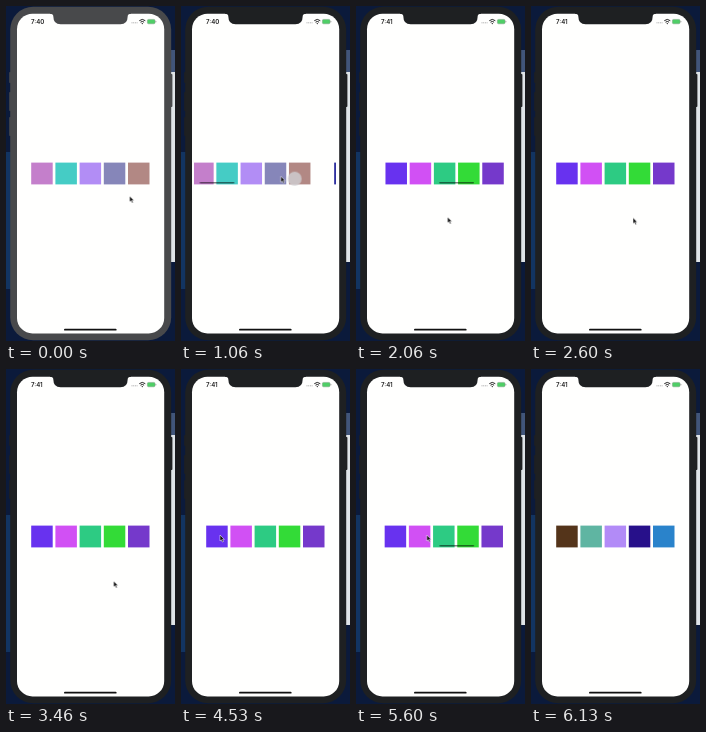
Animation of 169 by 335 pixels, one loop 6200 ms. Source, as an HTML page:

```html
<!DOCTYPE html>
<html lang="en">
<head>
<meta charset="utf-8">
<title>Paged colour squares</title>
<style>
@property --off { syntax: "<number>"; inherits: true; initial-value: 0; }
html, body { margin: 0; width: 100%; height: 100%; overflow: hidden; background: #0b1a38; }
svg { display: block; width: 169px; height: 335px; animation: scroll 6200ms infinite; }
svg * { animation-duration: 6200ms; animation-iteration-count: infinite; }
text { font: 600 6.1px Inter, "Liberation Sans", sans-serif; fill: #222; }

#strip { transform: translateX(calc(var(--off) * -1px)); }
#thumb { transform: translateX(calc(var(--off) * .243px)); }
#thumb rect { animation-name: fade; }
.case { fill: #1e2022; animation-name: focus; animation-timing-function: step-end; }
.early { animation-name: early; animation-timing-function: step-end; }
.late { animation-name: late; animation-timing-function: step-end; }
#cursor { animation-name: move; animation-timing-function: ease-in-out; }
#touch { animation-name: drag; }
#touch circle { animation-name: press; animation-timing-function: step-end; }

@keyframes scroll {
  0%, 15.32% { --off: 0; animation-timing-function: ease-in; }
  17.1% { --off: 13.7; animation-timing-function: linear; }
  19.2% { --off: 70; animation-timing-function: ease-out; }
  24.2%, 25.16% { --off: 142; animation-timing-function: ease-in; }
  28.39% { --off: 212; animation-timing-function: ease-out; }
  33.23% { --off: 279.7; animation-timing-function: ease-out; }
  36.45%, 74.2% { --off: 284; animation-timing-function: ease-in-out; }
  80.65%, 84.68% { --off: 253; animation-timing-function: ease-out; }
  90.32% { --off: 280.5; animation-timing-function: ease-out; }
  93.55% { --off: 284; animation-timing-function: step-end; }
  97.74%, 100% { --off: 426; }
}
@keyframes fade {
  0%, 15.32% { opacity: 0; }
  16.1%, 38.7% { opacity: 1; }
  42%, 74.2% { opacity: 0; }
  75%, 93.8% { opacity: 1; }
  97.3%, 100% { opacity: 0; }
}
@keyframes focus {
  0% { fill: #48494b; }
  15.08%, 100% { fill: #1e2022; }
}
@keyframes early {
  0% { visibility: visible; }
  24.68%, 100% { visibility: hidden; }
}
@keyframes late {
  0% { visibility: hidden; }
  24.68%, 100% { visibility: visible; }
}
@keyframes move {
  0%, 4% { transform: translate(123.6px, 190px); visibility: visible; }
  14% { transform: translate(128px, 171px); animation-timing-function: ease-in; }
  17.1% { transform: translate(100.3px, 170.3px); animation-timing-function: ease-out; }
  19.2% { transform: translate(58px, 170px); }
  24.7% { transform: translate(128px, 172px); }
  28.39% { transform: translate(58px, 176px); }
  33.23% { transform: translate(91.5px, 211px); }
  48%, 56% { transform: translate(107.6px, 212px); }
  70%, 74.2% { transform: translate(39px, 166px); }
  80.65%, 97% { transform: translate(70.8px, 166px); visibility: visible; }
  97.74%, 100% { transform: translate(70.8px, 166px); visibility: hidden; }
}
@keyframes drag {
  0%, 15.32% { transform: translate(128px, 173px); animation-timing-function: ease-in; }
  17.1% { transform: translate(114px, 172.7px); animation-timing-function: linear; }
  19.2% { transform: translate(58px, 172px); }
  25.16% { transform: translate(128px, 173px); animation-timing-function: ease-in; }
  28.39% { transform: translate(58px, 177px); }
  74.2% { transform: translate(40px, 167px); animation-timing-function: ease-in-out; }
  80.65%, 100% { transform: translate(71px, 167px); }
}
@keyframes press {
  0% { opacity: 0; }
  15.32% { opacity: .85; }
  19.2% { opacity: 0; }
  25.16% { opacity: .85; }
  28.39% { opacity: 0; }
  74.2% { opacity: .85; }
  84.68%, 100% { opacity: 0; }
}
</style>
</head>
<body>
<svg viewBox="0 0 169 335">
  <defs>
    <clipPath id="view"><rect x="13" y="150" width="142" height="35"/></clipPath>
  </defs>

  <!-- desktop behind the phone -->
  <rect width="169" height="335" fill="#0b1a3b"/>
  <rect y="146" width="8" height="137" fill="#123461"/>
  <rect x="161" y="44" width="8" height="22" fill="#41557a"/>
  <rect x="161" y="66" width="8" height="190" fill="#dfe4e8"/>

  <!-- phone -->
  <g class="case">
    <rect x="3.2" y="66" width="2" height="11" rx=".8"/>
    <rect x="3.2" y="86" width="2" height="19" rx=".8"/>
    <rect x="3.2" y="111" width="2" height="19" rx=".8"/>
    <rect x="164" y="68" width="2.4" height="33" rx=".8"/>
    <rect x="4.2" y=".8" width="161" height="333.4" rx="23"/>
  </g>
  <rect x="11" y="7.8" width="147.2" height="319.6" rx="15.5" fill="#fffffe"/>
  <path class="case" d="M44 7h81v.8q-3.4 0-3.4 3.2q0 7.2-7.2 7.2H54.6q-7.2 0-7.2-7.2q0-3.2-3.4-3.2z"/>

  <!-- status bar -->
  <text class="early" x="25" y="17.9">7:40</text>
  <text class="late" x="25" y="17.9">7:41</text>
  <path d="M125.5 16.8h6" stroke="#aaa" stroke-dasharray="1 .7"/>
  <g fill="none" stroke="#222" stroke-width="1">
    <path d="M133.3 14.7q3-2.6 6 0M134.5 16.2q1.8-1.5 3.6 0"/>
  </g>
  <circle cx="136.3" cy="17.6" r=".7" fill="#222"/>
  <rect x="141.4" y="13.4" width="7.6" height="4.4" rx="1.2" fill="#4fce66" stroke="#7c9c82" stroke-width=".5"/>
  <rect x="149.5" y="14.8" width=".8" height="1.6" rx=".4" fill="#888"/>

  <!-- pager -->
  <g clip-path="url(#view)">
    <g id="strip"></g>
    <g id="thumb"><rect x="15.2" y="176.1" width="34.8" height="1.4" rx=".7" fill="#000" fill-opacity=".5"/></g>
  </g>

  <rect x="58" y="322.7" width="52.6" height="1.9" rx=".95" fill="#111"/>

  <g id="touch"><circle r="7" fill="#cfcdd0"/></g>
  <path id="cursor" d="M0 0V6L1.4 4.8L2.4 7L3.5 6.5L2.5 4.4H4.3Z" fill="#111" stroke="#fff" stroke-width=".5"/>
</svg>
<script>
const pages = [
  ["#c47fcb", "#45ccc5", "#b28df5", "#8686b9", "#b28884"],
  ["#2f309f", "#58b56c", "#c78a4e", "#7a62d0", "#4aa3c4"],
  ["#6832ef", "#d150f4", "#2dcb83", "#33db37", "#7539cb"],
  ["#54341a", "#5fb5a2", "#b28bf7", "#27108a", "#2a83cb"]
];
const strip = document.getElementById("strip");

function addSquare(x, fill) {
  const square = document.createElementNS(strip.namespaceURI, "rect");
  const attrs = { x, y: 156.6, width: 21.5, height: 21.8, fill };
  for (const name in attrs) square.setAttribute(name, attrs[name]);
  strip.append(square);
}

pages.forEach((colors, page) =>
  colors.forEach((color, i) => addSquare(25.2 + page * 142 + i * 24.2, color)));
</script>
</body>
</html>
```
